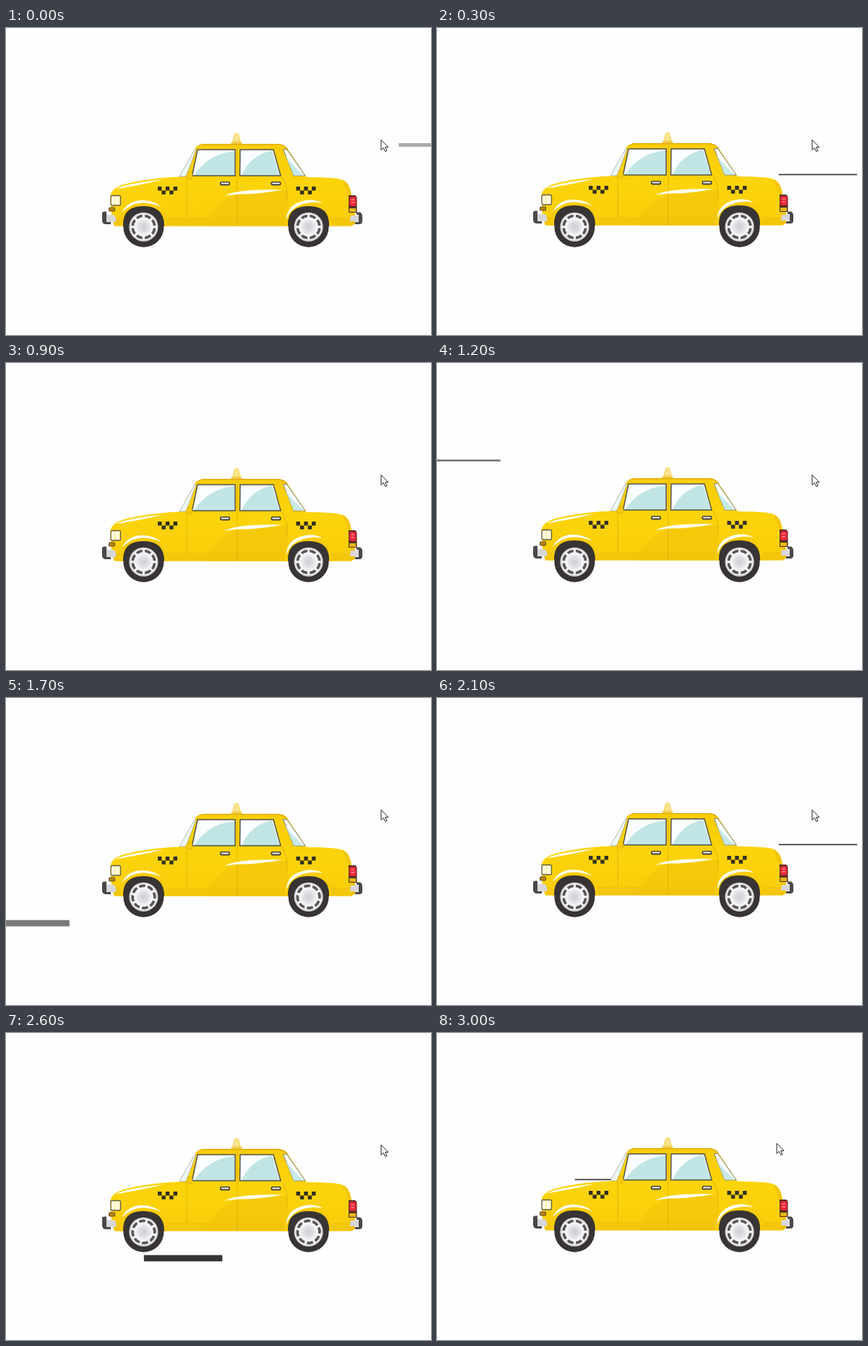
An HTML page for the animation above (3100 ms loop, 588 px wide and 424 px high).

```html
<!DOCTYPE html>
<html lang="en">
<head>
<meta charset="utf-8">
<title>Taxi</title>
<style>
html, body { margin: 0; width: 100%; height: 100%; overflow: hidden; background: #fffeff; }
svg { display: block; width: 588px; height: 424px; }
</style>
</head>
<body>
<svg viewBox="0 0 588 424">
  <defs>
    <linearGradient id="paint" x1="0" y1="0" x2="0" y2="1">
      <stop offset="0" stop-color="#f8cc08"/>
      <stop offset=".5" stop-color="#fcd40b"/>
      <stop offset="1" stop-color="#f8cd0a"/>
    </linearGradient>
    <radialGradient id="hub">
      <stop offset="0" stop-color="#d0ced2"/>
      <stop offset=".6" stop-color="#e2e0e4"/>
      <stop offset="1" stop-color="#f8f7f9"/>
    </radialGradient>
    <filter id="soft" x="-5%" y="-5%" width="110%" height="110%" color-interpolation-filters="sRGB">
      <feGaussianBlur stdDeviation=".5"/>
    </filter>
    <clipPath id="shell"><path d="M150 273.500L146 262L144.500 231Q146 222 160 217Q192 207.500 240 205.500L261 168Q265 160 275 160H375Q385 160 389 166L416 206Q453 206 465 209.500Q475 213 477.500 228L483 258V270L478 273.500Z"/></clipPath>
    <path id="checks" fill="#332f20" d="M0 0h5.400v5.400h-5.400zM10.800 0h5.400v5.400h-5.400zM21.600 0h5.400v5.400h-5.400zM5.400 5.400h5.400v5.400h-5.400zM16.200 5.400h5.400v5.400h-5.400z"/>
    <g id="handle">
      <rect width="14" height="5.500" rx="2" fill="#45423a"/>
      <rect x="1.500" y="1.500" width="11" height="2" rx="1" fill="#f4f2ea"/>
    </g>
  </defs>
  <rect width="588" height="424" fill="#fffeff"/>
  <g id="streaks" fill="#373435"></g>
  <g filter="url(#soft)">
    <g id="body">
      <path d="M312 161L316 146.500Q319 143 322 146.500L326 161Z" fill="#f7da6c"/>
      <path d="M317.500 146L315.500 156H322.500L320.500 146Z" fill="#fae48f"/>
      <rect x="311.500" y="157.500" width="15" height="3.500" fill="#f0ca4a"/>

      <g clip-path="url(#shell)">
        <rect x="130" y="155" width="360" height="120" fill="url(#paint)"/>
        <path d="M277 274Q282 245 320 230L390 224V274Z" fill="#f3c50b" opacity=".6"/>
        <path d="M140 262H490V275H140Z" fill="#f0c20b" opacity=".6"/>
        <path d="M464 207L477 213L484 275H477Q478 235 464 207Z" fill="#eabb0b" opacity=".5"/>
        <path d="M260 168Q263 160.500 275 160.500H375Q385 160.500 390 168" fill="none" stroke="#e3ad0c" stroke-width="2"/>
      </g>
      <path d="M152 222Q172 213.500 217 209.500Q190 216 166 220Q156 222 152 222Z" fill="#fffdf0"/>

      <path d="M261 168L240 205H249L263 168Z" fill="#edf8f9" stroke="#a7aaa5" stroke-width=".8"/>
      <path d="M383.500 167.500H388.500L414 204H398Z" fill="#f8fdfe" stroke="#7d827a" stroke-width="1"/>
      <path d="M387 177L398 203.500H412Q400 194 387 177Z" fill="#c7e8e8"/>
      <path d="M265 168H317V204H257.500Z" fill="#fbfefe"/>
      <path d="M260 204Q279 174 316 170V204Z" fill="#c1e5e5"/>
      <path d="M324 168H370L380 204H323.500Z" fill="#fbfefe"/>
      <path d="M326 204Q337 176 368 169L378.500 204Z" fill="#c1e5e5"/>
      <path d="M265 168H317V204H257.500ZM324 168H370L380 204H323.500Z" fill="none" stroke="#535347" stroke-width="1.500"/>
      <path d="M248 207L252 198Q257 198 258 204L256 209Z" fill="#f5ca0c" stroke="#d9a90d" stroke-width=".7"/>

      <path d="M250 209V262M320 164V273M382 206Q391 219 388 239" fill="none" stroke="#d5a80c" opacity=".75"/>
      <path d="M302 232Q318 222 383 223.500Q350 229.500 325 229.500Q311 230 302 232Z" fill="#fffef5"/>
      <use href="#handle" x="296" y="212"/>
      <use href="#handle" x="366.500" y="212"/>
      <use href="#checks" x="210" y="219"/>
      <use href="#checks" x="401.500" y="219"/>

      <path d="M157 273.500Q157 240 190 240Q223 240 223 273.500ZM385 273.500Q385 240 418 240Q451 240 451 273.500Z" fill="#f8cc0b"/>
      <path d="M160 255Q169 238 188 238Q204 238 215 247Q202 241.500 188 241.500Q173 242 160 255ZM387.500 265Q389 241 418 237.500Q431 237 438 242Q428 240 418 241.500Q395 245 387.500 265Z" fill="#fffdf2"/>
      <path d="M162 273.500Q161 246 190 246Q219 246 219 273.500ZM390 273.500Q389 246 418.500 246Q448 246 447 273.500Z" fill="#39352d"/>

      <rect x="145" y="231.500" width="13.500" height="13.500" rx="2" fill="#fff5ba" stroke="#655e43" stroke-width="1.300"/>
      <path d="M148 233V244M154 233V244" stroke="#fff" stroke-width="2"/>
      <rect x="142.500" y="248" width="8" height="5" rx="1" fill="#b98513" stroke="#584c24"/>
      <path d="M139 258H149Q153 260 152 268H139Z" fill="#d8d7dc"/>
      <path d="M133 256Q133 253.500 136 253.500H139V268H145V271H137Q133 270 133 266Z" fill="#4b484a"/>

      <path d="M474 231H483Q485.500 232 485.500 236V255H474Z" fill="#543023"/>
      <rect x="475" y="233" width="9.500" height="13" rx="3" fill="#ed2537"/>
      <path d="M477.500 237h4.500M477.500 241h4.500" stroke="#ff8d95" stroke-width="1.500"/>
      <rect x="475" y="249" width="9" height="5" fill="#e5b715"/>
      <path d="M477 259H488V267H476Z" fill="#d8d7dc"/>
      <path d="M485 254.500H490Q493 256 493 260V267Q493 271 489 271H483V268H488V258H485Z" fill="#4b484a"/>
    </g>
    <g id="wheels"></g>
  </g>
  <path id="cursor" d="M0 0V14L3.300 11L5.700 16L8 15L5.700 10.200H10Z" fill="#fff" stroke="#222"/>
</svg>
<script>
const NS = "http://www.w3.org/2000/svg";
const $ = id => document.getElementById(id);

function add(parent, tag, attrs) {
  const el = document.createElementNS(NS, tag);
  for (const key in attrs) el.setAttribute(key, attrs[key]);
  return parent.appendChild(el);
}

const LOOP = 3100, TICK = 100, STEP = 70.5;

// Height on the stage and thickness of each kind of streak.
const high = [133.3, 2.7], roof = [159, 5], mid = [201.6, 1.7], road = [306.7, 8.7];

// Kind, first tick, first position counted in steps from the right.
const runs = [
  [roof, 0, 0], [mid, 3, 1], [road, 5, 1],
  [high, 10, 2], [mid, 13, 2], [road, 15, 2],
  [roof, 18, 0], [mid, 21, 1], [road, 25, 2],
  [roof, 27, 0], [mid, 29, 2]
].map(([kind, tick, pos]) => ({
  tick, pos,
  el: add($("streaks"), "rect", { y: kind[0], height: kind[1], width: 108.5 })
}));

function makeWheel(x) {
  const wheel = add($("wheels"), "g", { transform: `translate(${x} 274.700)` });
  add(wheel, "circle", { r: 28, fill: "#383436" });
  add(wheel, "circle", { r: 20, fill: "#f4f3f5" });
  add(wheel, "circle", { r: 19, fill: "none", stroke: "#c4c2c6", "stroke-width": 1 });
  const spin = add(wheel, "g", {});
  for (let i = 0; i < 8; i++) {
    add(spin, "path", {
      d: "M-3.500-13L-5-16Q0-18.500 5-16L3.500-13Q0-14 -3.500-13Z",
      fill: "#5a5659", transform: `rotate(${i * 45 + 22.5})`
    });
  }
  add(wheel, "circle", { r: 12, fill: "url(#hub)" });
  return spin;
}
const spins = [190.4, 418.6].map(makeWheel);

function draw(ms) {
  const tick = Math.floor((ms % LOOP) / TICK);
  for (const run of runs) {
    const pos = run.pos + 3 * (tick - run.tick);
    const shown = tick >= run.tick && pos <= 8;
    run.el.setAttribute("x", 543.3 - STEP * pos);
    run.el.setAttribute("opacity", !shown ? 0 : pos === 0 ? 0.42 : pos === 8 ? 0.66 : 1);
  }
  const phase = tick % 9;
  const lift = phase >= 2 && phase <= 4 ? -1 : 0;
  $("body").setAttribute("transform", `translate(0 ${lift})`);
  for (const spin of spins) spin.setAttribute("transform", `rotate(${-15 * tick})`);
  $("cursor").setAttribute("transform", tick < 30 ? "translate(519 154.500)" : "translate(470 152.500)");
}

const start = performance.now();
function loop() {
  draw(performance.now() - start);
  requestAnimationFrame(loop);
}
loop();
</script>
</body>
</html>
```
